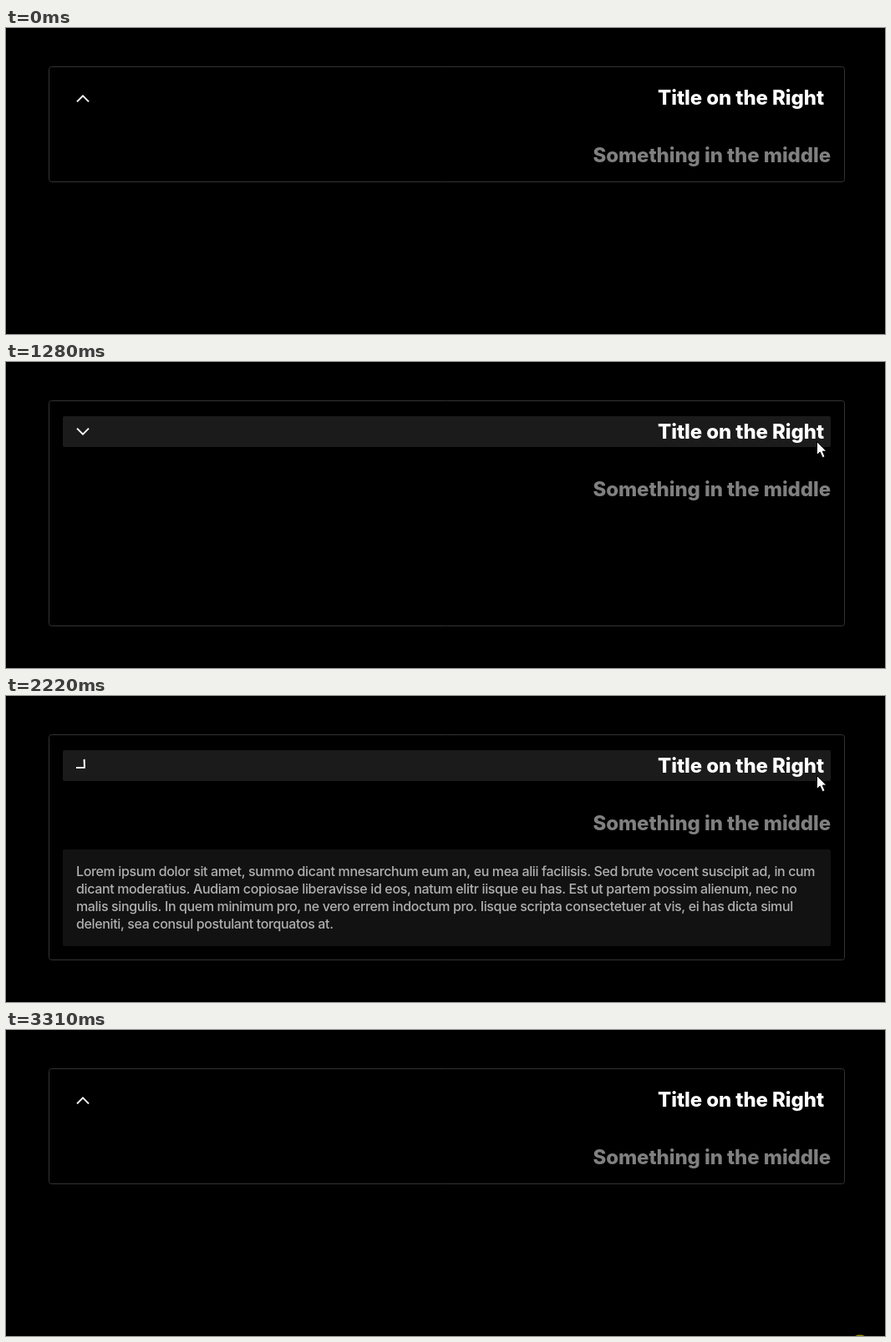
An HTML page with a canvas that plays this animation: 1052x367 px, repeating every 3.45 s.

```html
<!DOCTYPE html>
<html lang="en">
<head>
<meta charset="utf-8">
<title>Accordion</title>
<style>
  html, body { margin: 0; width: 100%; height: 100%; overflow: hidden; background: #000; }
  canvas { display: block; }
</style>
</head>
<body>
<canvas id="stage" width="1052" height="367"></canvas>
<script>
const ctx = document.getElementById('stage').getContext('2d');
const LOOP = 3450;
const REST = { x: 970, y: 94 };
const EXIT = { x: 1022, y: 377.6 };
const PANEL = '#1b1b1b';
const LINES = [
  'Lorem ipsum dolor sit amet, summo dicant mnesarchum eum an, eu mea alii facilisis. Sed brute vocent suscipit ad, in cum',
  'dicant moderatius. Audiam copiosae liberavisse id eos, natum elitr iisque eu has. Est ut partem possim alienum, nec no',
  'malis singulis. In quem minimum pro, ne vero errem indoctum pro. Iisque scripta consectetuer at vis, ei has dicta simul',
  'deleniti, sea consul postulant torquatos at.'
];

const clamp = v => Math.min(1, Math.max(0, v));
const smooth = v => { v = clamp(v); return v * v * (3 - 2 * v); };
// Whole steps since a phase began; -1 before it
const stepAt = (t, start, size) => t < start ? -1 : Math.min(7, Math.floor((t - start) / size));

function sceneAt(t) {
  const enter = stepAt(t, 330, 70);
  const open = stepAt(t, 1020, 65);
  const close = stepAt(t, 2080, 70);
  const leave = stepAt(t, 2640, 67);
  const s = { y: EXIT.y, header: 0, box: 0, body: 0, turn: 0, click: false };

  if (leave >= 0) {
    s.y = REST.y + (EXIT.y - REST.y) * smooth((leave + 0.45) / 6);
    s.header = clamp(1 - (leave - 1) / 3);
  } else if (enter >= 0) {
    s.y = REST.y + 189 * Math.pow(clamp(1 - enter / 6), 2.2);
    s.header = clamp((enter - 4) / 2.6);
  }

  if (close >= 0) {
    s.box = 1 - smooth((close - 4) / 3);
    s.body = clamp(1 - (close - 1) / 3);
    s.turn = 1 - smooth((close - 1) / 3);
  } else if (open >= 0) {
    s.box = smooth((open - 1) / 3);
    s.body = clamp((open - 4) / 3);
    s.turn = smooth((open - 1) / 3);
  }

  s.click = open === 0 || open === 1 || close === 0 || close === 1 || t >= 3310;
  const u = (s.y - REST.y) / (EXIT.y - REST.y);
  s.x = REST.x + (EXIT.x - REST.x) * (1 - Math.pow(1 - u, 3));
  return s;
}

function panel(x, y, w, h, alpha) {
  ctx.globalAlpha = alpha;
  ctx.fillStyle = PANEL;
  ctx.beginPath();
  ctx.roundRect(x, y, w, h, 2);
  ctx.fill();
  ctx.globalAlpha = 1;
}

function heading(text, right, base, color) {
  ctx.font = '800 24px Inter, sans-serif';
  ctx.letterSpacing = '-0.1px';
  ctx.textAlign = 'right';
  ctx.fillStyle = color;
  ctx.fillText(text, right, base);
}

function chevron(turn) {
  ctx.save();
  ctx.translate(92, 84);
  ctx.rotate(turn * Math.PI);
  ctx.strokeStyle = '#fff';
  ctx.lineWidth = 2;
  ctx.beginPath();
  ctx.moveTo(-7, 4.4);
  ctx.lineTo(0, -2.7);
  ctx.lineTo(7, 4.4);
  ctx.stroke();
  ctx.restore();
}

function paragraph(alpha) {
  panel(68, 184, 919, 116, alpha);
  ctx.globalAlpha = alpha;
  ctx.font = '500 16px Inter, sans-serif';
  ctx.letterSpacing = '-0.37px';
  ctx.textAlign = 'left';
  ctx.fillStyle = '#fff';
  LINES.forEach((line, i) => ctx.fillText(line, 84, 216 + i * 21));
  ctx.globalAlpha = 1;
}

function pointer(x, y) {
  ctx.save();
  ctx.translate(Math.round(x) + 0.5, Math.round(y) + 1.5);
  ctx.beginPath();
  [[0, 0], [0, 16], [3.7, 12.6], [6.8, 19.3], [9.6, 18], [6.8, 11.6], [11.4, 11.6]]
    .forEach(p => ctx.lineTo(...p));
  ctx.closePath();
  ctx.fillStyle = '#fff';
  ctx.fill();
  ctx.strokeStyle = '#000';
  ctx.lineWidth = 1;
  ctx.stroke();
  ctx.restore();
}

function draw(t) {
  const s = sceneAt(t);
  ctx.fillStyle = '#000';
  ctx.fillRect(0, 0, 1052, 367);

  ctx.strokeStyle = '#333';
  ctx.lineWidth = 1;
  ctx.beginPath();
  ctx.roundRect(51.5, 46.5, 952, 138 + Math.round(132 * s.box), 3);
  ctx.stroke();

  panel(68, 65, 919, 37, s.header);
  chevron(s.turn);
  heading('Title on the Right', 979, 92, '#fff');
  heading('Something in the middle', 987, 161, '#808080');
  if (s.body > 0) paragraph(s.body);

  if (s.click) {
    ctx.fillStyle = 'rgba(255, 240, 0, 0.58)';
    ctx.beginPath();
    ctx.arc(s.x, s.y, 12, 0, Math.PI * 2);
    ctx.fill();
  }
  pointer(s.x, s.y);
}

const begin = performance.now();
function tick() {
  draw((performance.now() - begin) % LOOP);
  requestAnimationFrame(tick);
}
tick();
</script>
</body>
</html>
```
